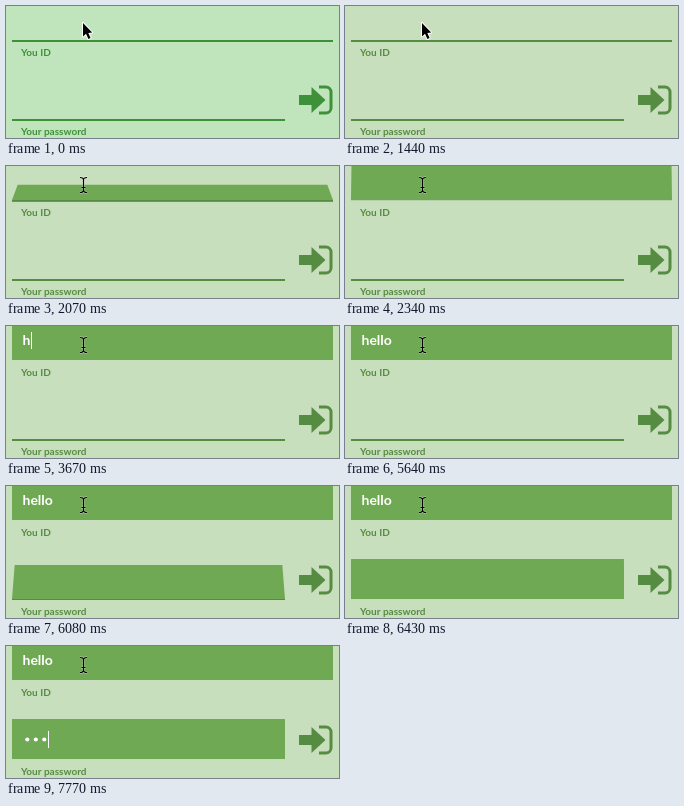
An HTML page with a canvas that plays this animation: 333 px wide and 132 px high, repeating every 8000 ms.

```html
<!DOCTYPE html>
<html lang="en">
<head>
<meta charset="utf-8">
<title>Login form</title>
<style>
html, body { margin: 0; width: 100%; height: 100%; overflow: hidden; background: #c8dfbd; }
canvas { display: block; width: 333px; height: 132px; }
</style>
</head>
<body>
<canvas id="stage" width="333" height="132"></canvas>
<script>
const ctx = document.getElementById('stage').getContext('2d');
const LOOP = 8000, STEP = 88, FLIP = 500, DEPTH = 1000, HEIGHT = 40;
const FONT = 'Lato, "Open Sans", sans-serif';
const COOL = { bg: '#c0e5bd', dark: '#3f9139' };
const WARM = { bg: '#c8dfbd', dark: '#568b42' };
const FILL = '#6fa953';

const userField = {
  left: 6, right: 327, y: 34, start: 1980, lag: 4,
  keys: [3670, 4480, 4840, 4920, 5190],
  carets: [17, 25, 32, 36, 40, 47],
  shown: [[3050, 3500], [3670, 4210], [4480, 5640]]
};
const passField = {
  left: 6, right: 279, y: 113, start: 6000, lag: 107,
  keys: [7320, 7500, 7770],
  carets: [17, 25, 34, 42],
  shown: [[6960, LOOP]]
};

const bezier = (a, b, u) => 3 * a * u * (1 - u) ** 2 + 3 * b * u * u * (1 - u) + u ** 3;

// CSS "ease" timing curve
function ease(x) {
  if (x <= 0) return 0;
  if (x >= 1) return 1;
  let lo = 0, hi = 1;
  for (let i = 0; i < 24; i++) {
    const mid = (lo + hi) / 2;
    if (bezier(0.25, 0.25, mid) < x) lo = mid; else hi = mid;
  }
  return bezier(0.1, 1, lo);
}

function polygon(points, color) {
  ctx.beginPath();
  points.forEach(([x, y]) => ctx.lineTo(x, y));
  ctx.closePath();
  ctx.fillStyle = color;
  ctx.fill();
}

function label(text, x, y, size, color) {
  ctx.font = `700 ${size}px ${FONT}`;
  ctx.fillStyle = color;
  ctx.fillText(text, x, y);
}

// The panel swings up around its lower edge; the line is its thin front side.
function drawField(f, t, dark) {
  const frame = Math.floor((t - f.start + 8) / STEP);
  const p = t < f.start ? 0 : ease((f.lag + Math.max(0, frame) * STEP) / FLIP);
  const angle = (1 - p) * Math.PI / 2;
  const back = HEIGHT * Math.sin(angle);
  const scale = DEPTH / (DEPTH + back);
  const inset = (f.right - f.left) / 2 * (1 - scale);
  const top = f.y - HEIGHT * Math.cos(angle) * scale;
  if (p > 0) {
    polygon([[f.left + inset, top], [f.right - inset, top], [f.right, f.y], [f.left, f.y]], FILL);
  }
  ctx.fillStyle = dark;
  ctx.fillRect(f.left, f.y, f.right - f.left, 2 * Math.sin(angle));
}

const typed = (f, t) => f.keys.filter(k => t >= k).length;

function drawCaret(f, t) {
  if (!f.shown.some(([a, b]) => t >= a && t < b)) return;
  ctx.fillStyle = '#fff';
  ctx.fillRect(f.carets[typed(f, t)], f.y - 28, 1, 17);
}

function drawIcon(color) {
  polygon([[293, 89], [305.5, 89], [305.5, 81], [319.5, 94], [305.5, 107], [305.5, 99], [293, 99]], color);
  ctx.beginPath();
  ctx.moveTo(313, 81);
  ctx.arcTo(325, 81, 325, 94, 5);
  ctx.arcTo(325, 107, 313, 107, 5);
  ctx.lineTo(313, 107);
  ctx.strokeStyle = color;
  ctx.lineWidth = 3;
  ctx.stroke();
}

function drawArrow() {
  const shape = [[77, 17], [77, 30.5], [80, 27.8], [82.4, 33], [84.6, 32], [82.3, 27], [86.2, 26.6]];
  ctx.lineJoin = 'round';
  polygon(shape, '#000');
  ctx.strokeStyle = '#fff';
  ctx.lineWidth = 2;
  ctx.stroke();
  polygon(shape, '#000');
}

function drawBeam() {
  const trace = (width, color) => {
    ctx.beginPath();
    ctx.moveTo(74, 11.5);
    ctx.quadraticCurveTo(77.5, 11.5, 77.5, 14);
    ctx.quadraticCurveTo(77.5, 11.5, 81, 11.5);
    ctx.moveTo(77.5, 13);
    ctx.lineTo(77.5, 25);
    ctx.moveTo(74, 26.5);
    ctx.quadraticCurveTo(77.5, 26.5, 77.5, 24);
    ctx.quadraticCurveTo(77.5, 26.5, 81, 26.5);
    ctx.moveTo(75.5, 21.5);
    ctx.lineTo(79.5, 21.5);
    ctx.lineWidth = width;
    ctx.strokeStyle = color;
    ctx.stroke();
  };
  trace(2.4, 'rgba(255,255,255,.4)');
  trace(1.2, '#000');
}

function draw(t) {
  const theme = t < 1440 ? COOL : WARM;
  ctx.fillStyle = theme.bg;
  ctx.fillRect(0, 0, 333, 132);
  drawField(userField, t, theme.dark);
  drawField(passField, t, theme.dark);
  label('You ID', 15, 50, 10, theme.dark);
  label('Your password', 15, 129, 10, theme.dark);
  drawIcon(theme.dark);

  label('hello'.slice(0, typed(userField, t)), 16.5, 19, 14, '#fff');
  for (let i = 0; i < typed(passField, t); i++) {
    ctx.beginPath();
    ctx.arc(21.3 + i * 8.5, 93.5, 2.1, 0, Math.PI * 2);
    ctx.fillStyle = '#fff';
    ctx.fill();
  }
  drawCaret(userField, t);
  drawCaret(passField, t);
  if (t < userField.start) drawArrow(); else drawBeam();
}

const begin = performance.now();
function tick() {
  draw((performance.now() - begin) % LOOP);
  requestAnimationFrame(tick);
}
tick();
</script>
</body>
</html>
```
